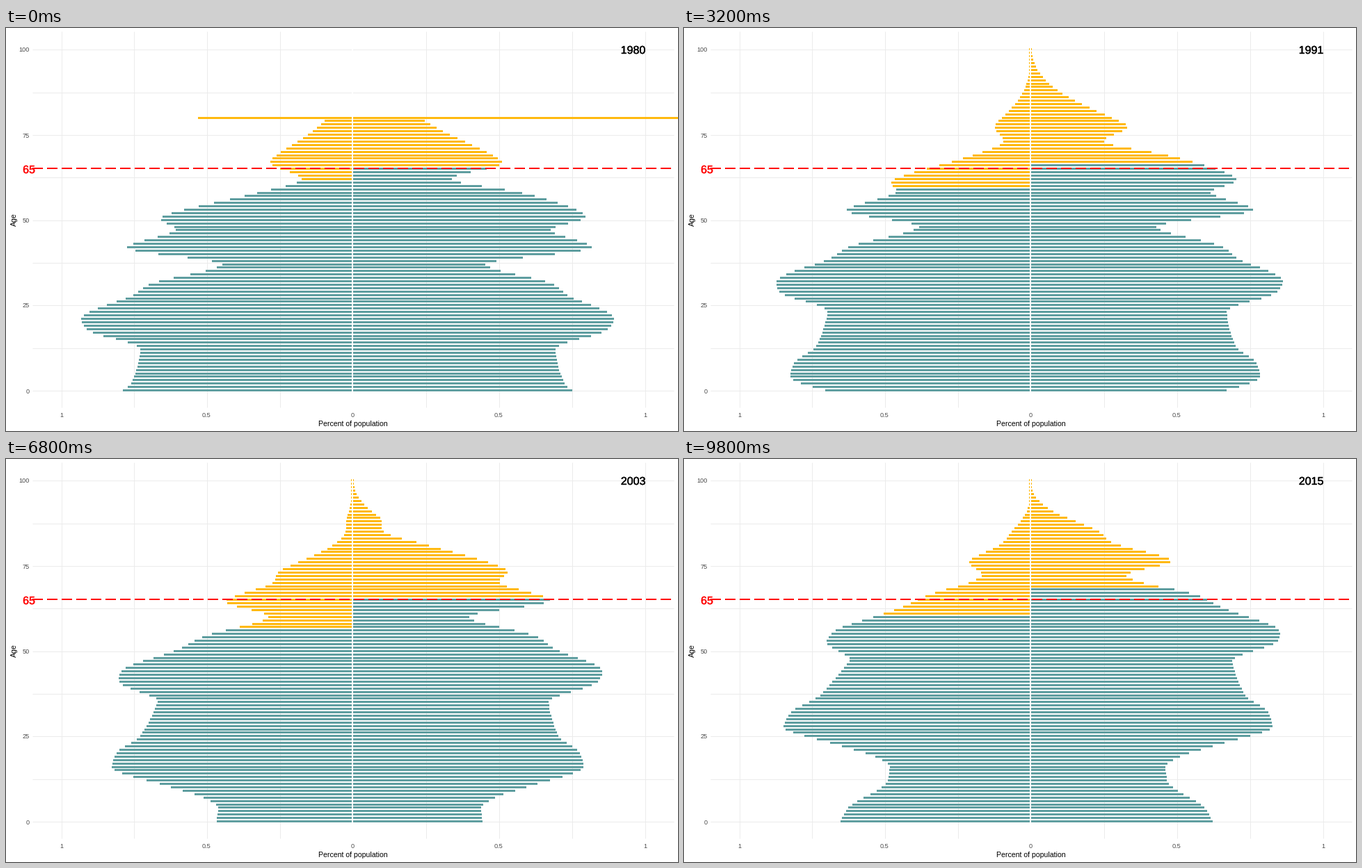
A matplotlib script for the animation above (10 s loop, 966 by 580 pixels).

```python
import numpy as np
import matplotlib.pyplot as plt
from matplotlib.animation import FuncAnimation
from matplotlib.collections import PolyCollection
from matplotlib.patheffects import withStroke

W, H, DPI = 966, 580, 100
PX = 72 / DPI
X0, UNIT = 498, 419.5          # centre line, pixels per percent
Y0, STEP = 521.55, 4.906       # age 0, pixels per year of age
WORK, RETIRED, GRID = "#5F9EA0", "#FFB90F", "#EBEBEB"

plt.rcParams["font.family"] = "Liberation Sans"

# Turning points of cohort size: birth year, percent of population.
BORN, SIZE = np.array([
    (1870, .600), (1901, .505), (1913, .639), (1918, .389), (1922, .636),
    (1929, .832), (1933, .696), (1938, .830), (1943, .458), (1949, .691),
    (1952, .734), (1959, .892), (1962, .870), (1968, .691), (1978, .720),
    (1983, .794), (1987, .806), (1993, .605), (1996, .496), (1999, .448),
    (2003, .453), (2011, .577), (2015, .603)]).T

# Year and first retired age, left and right.
RETIRE = [((1984, 62), (2000, 57), (2006, 57), (2015, 61)),
          ((1980, 66), (1984, 67), (1991, 67), (2001, 65), (2015, 69))]


def smooth(x, xs, ys):
    """Monotone cubic through (xs, ys), held constant outside."""
    x = np.clip(x, xs[0], xs[-1])
    h = np.diff(xs)
    s = np.diff(ys) / h
    a, b = s[:-1], s[1:]
    turn = a * b <= 0
    inner = np.where(turn, 0, 2 * a * b / np.where(turn, 1, a + b))
    m = np.concatenate([s[:1], inner, s[-1:]])
    i = np.clip(np.searchsorted(xs, x) - 1, 0, len(h) - 1)
    t = (x - xs[i]) / h[i]
    u = 1 - t
    return (u * u * (1 + 2 * t) * ys[i] + t * t * (3 - 2 * t) * ys[i + 1]
            + h[i] * t * u * (u * m[i] - t * m[i + 1]))


def population(year):
    """Percent per age for both sides: cohort size times survival."""
    age = np.arange(111)
    born = year - age
    drift = 0.975 + 0.00015 * (year - 1995) ** 2
    right = smooth(born, BORN, SIZE) * drift
    right = right * np.exp(-np.exp((age - 82.5) / 10.5))
    war = 1 - 0.28 * np.exp(-((born - 1920) / 6.5) ** 2)
    left = right * 1.045 * np.exp(-(age / 79) ** 3.6) * war
    if year < 1990:                      # 80 and over in a single bar
        return [np.append(v[:80], v[80:].sum()) for v in (left, right)]
    return left[:101], right[:101]


def pyramid(year):
    verts, colors = [], []
    for sign, shares, ages in zip((-1, 1), population(year), RETIRE):
        limit = round(np.interp(year, *zip(*ages)))
        for age, share in enumerate(shares):
            x = X0 + sign * max(2, round(share * UNIT))
            y = round(Y0 - 1.5 - STEP * age)
            verts.append([(X0, y), (x, y), (x, y + 3), (X0, y + 3)])
            colors.append(RETIRED if age >= limit else WORK)
    return verts, colors


def year_at(ms):
    return 1980 + (ms + 100) // 300 if ms < 8600 else 2009 + (ms - 8600) // 200


fig = plt.figure(figsize=(W / DPI, H / DPI), dpi=DPI, facecolor="white")
ax = fig.add_axes([0, 0, 1, 1])
ax.set(xlim=(0, W), ylim=(H, 0))
ax.axis("off")


def line(xs, ys, color, px=1, **kw):
    ax.plot(xs, ys, color=color, lw=px * PX, solid_capstyle="butt", **kw)


def label(x, y, s, px, color="black", ha="center", **kw):
    return ax.text(x, y, s, fontsize=px * PX, color=color, ha=ha,
                   va="baseline", **kw)


def heavy(color):
    return [withStroke(linewidth=0.4 * PX, foreground=color)]


for i in range(9):
    x = int(X0 + 0.6 + UNIT * (i - 4) / 4) + 0.5
    y = int(Y0 - STEP * 12.5 * i) + 0.5
    if i != 4:
        line([x, x], [5, 546], GRID, zorder=0.5)
    line([38, 960], [y, y], GRID, zorder=0.5)
    if i % 2 == 0:
        label(x, 559.5, f"{abs(i - 4) / 4:g}", 9.2, "#4D4D4D")
        label(34, y + 4, f"{12.5 * i:g}", 9.2, "#4D4D4D", ha="right")

label(498.5, 573, "Percent of population", 10.5)
label(14.5, 276, "Age", 10.5, rotation=90, rotation_mode="anchor")

bars = PolyCollection([], linewidths=0, edgecolors="none", antialiaseds=False)
ax.add_collection(bars, autolim=False)
line([X0, X0], [5, 546], "white", 2)
line([38, 960], [202, 202], "red", 2, linestyle=(0, (7.5, 3)))
label(33, 209, "65", 16, "red", path_effects=heavy("red"))
year_text = label(901.5, 37, "", 16, path_effects=heavy("black"))


def update(i):
    year = year_at(i * 100)
    verts, colors = pyramid(year)
    bars.set_verts(verts)
    bars.set_facecolor(colors)
    year_text.set_text(str(year))
    return bars, year_text


anim = FuncAnimation(fig, update, frames=100, interval=100, repeat=True,
                     repeat_delay=0)
plt.show()
```
